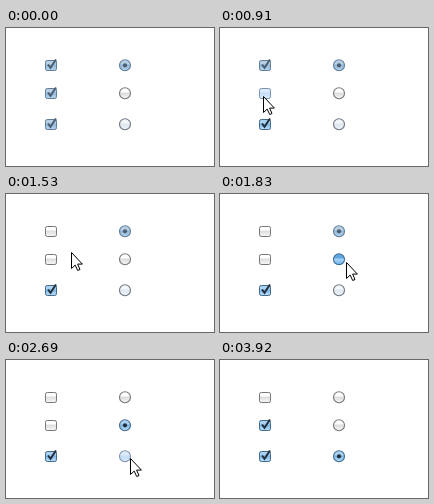
These frames come from a looping animation (208 px wide and 138 px high, 4.22 s). An HTML page with a canvas:

```html
<!DOCTYPE html>
<html lang="en">
<head>
<meta charset="utf-8">
<title>Checkboxes and radio buttons</title>
<style>
html, body { margin: 0; width: 100%; height: 100%; overflow: hidden; background: #fff; }
canvas { display: block; }
</style>
</head>
<body>
<canvas id="stage" width="208" height="138"></canvas>
<script>
const ctx = document.getElementById('stage').getContext('2d');
const LOOP = 4220, START = 220, STEP = 77.1;
const ROWS = [37, 65, 96], BOX_X = 45, RADIO_X = 119;

// border, top, middle, bottom, mark
const SKINS = {
  off: ['#777777', '#ffffff', '#dddddd', '#f5f5f5'],
  tint: ['#6c7480', '#f4f7fb', '#dfe6ee', '#eef3f9'],
  hover: ['#7c93b0', '#dceafa', '#c4dcf5', '#d9ebfd'],
  press: ['#3d6a94', '#5fa5e0', '#a9d4f7', '#6db4ee'],
  muted: ['#5f7d98', '#b9d0e4', '#93b8d8', '#b4d2ea', '#4b5d70'],
  on: ['#456b8c', '#a9d2f3', '#7cb7e8', '#b5dcfa', '#252f3b']
};

// Pointer tip for each step; a leg is [first step, x, y, x, y, ...].
const LEGS = [
  [0, 124, 127, 118, 119, 103, 105, 80, 89, 59, 77, 47, 72, 43, 70, 43, 68],
  [10, 43, 64, 44, 55, 45, 45, 46, 40],
  [16, 50, 45, 65, 58, 88, 71, 110, 76, 122, 73, 126, 68],
  [24, 126, 69, 127, 72, 128, 77, 128, 82, 127, 87, 125, 91,
    125, 96, 124, 100, 124, 98, 124, 98, 104, 91, 70, 79, 44, 69,
    37, 76, 36, 79, 40, 66, 42, 66, 43, 68],
  [44, 50, 74, 75, 91, 115, 111, 156, 128]
];
const EXIT = 48;

// [first step, skin] for every control
const BOXES = [
  [[-1, 'muted'], [12, 'on'], [15, 'hover'], [17, 'off']],
  [[-1, 'muted'], [5, 'on'], [9, 'hover'], [11, 'off'], [36, 'hover'],
    [37, 'off'], [40, 'hover'], [41, 'press'], [43, 'on']],
  [[-1, 'muted'], [4, 'on']]
];
const RADIOS = [
  [[-1, 'muted'], [23, 'off']],
  [[-1, 'off'], [20, 'hover'], [21, 'press'], [23, 'on'], [33, 'off']],
  [[-1, 'tint'], [29, 'hover'], [33, 'on']]
];

function skinAt(track, step) {
  let name = track[0][1];
  for (const [from, skin] of track) if (step >= from) name = skin;
  return SKINS[name];
}

function pointerAt(step) {
  if (step < 0 || step >= EXIT) return null;
  const leg = LEGS.filter(l => l[0] <= step).pop();
  const i = Math.min(1 + 2 * (step - leg[0]), leg.length - 2);
  return [leg[i], leg[i + 1]];
}

function gloss(y, r, skin) {
  const g = ctx.createLinearGradient(0, y - r, 0, y + r);
  g.addColorStop(0, skin[1]);
  g.addColorStop(0.4, skin[1]);
  g.addColorStop(0.5, skin[2]);
  g.addColorStop(1, skin[3]);
  return g;
}

function fillStroke(fill, stroke, width) {
  ctx.fillStyle = fill;
  ctx.strokeStyle = stroke;
  ctx.lineWidth = width;
  ctx.fill();
  ctx.stroke();
}

function drawBox(y, skin) {
  ctx.beginPath();
  ctx.roundRect(BOX_X - 5.5, y - 4.5, 11, 10, 1.8);
  fillStroke(gloss(y, 5, skin), skin[0], 1);
  if (!skin[4]) return;
  ctx.beginPath();
  ctx.moveTo(BOX_X - 3, y - 0.5);
  ctx.lineTo(BOX_X - 0.5, y + 2.8);
  ctx.lineTo(BOX_X + 5, y - 5.5);
  ctx.strokeStyle = skin[4];
  ctx.lineWidth = 2;
  ctx.stroke();
}

function drawRadio(y, skin) {
  ctx.beginPath();
  ctx.arc(RADIO_X, y + 0.3, 5.5, 0, Math.PI * 2);
  fillStroke(gloss(y, 5.5, skin), skin[0], 1.1);
  if (!skin[4]) return;
  ctx.beginPath();
  ctx.arc(RADIO_X, y + 0.3, 2.1, 0, Math.PI * 2);
  ctx.fillStyle = skin[4];
  ctx.fill();
}

const ARROW = new Path2D('M.5 .5V16.5L4.2 13.1L6.7 18.5L9 17.5L6.6 12.1H11.4Z');

function drawPointer(x, y) {
  ctx.save();
  ctx.translate(x, y);
  ctx.fillStyle = '#fff';
  ctx.strokeStyle = '#000';
  ctx.lineWidth = 1;
  ctx.fill(ARROW);
  ctx.stroke(ARROW);
  ctx.restore();
}

function draw(now) {
  const step = Math.floor((now % LOOP - START) / STEP + 0.15);
  ctx.fillStyle = '#fff';
  ctx.fillRect(0, 0, 208, 138);
  ROWS.forEach((y, i) => {
    drawBox(y, skinAt(BOXES[i], step));
    drawRadio(y, skinAt(RADIOS[i], step));
  });
  const tip = pointerAt(step);
  if (tip) drawPointer(...tip);
}

const began = performance.now();
function tick() {
  draw(performance.now() - began);
  requestAnimationFrame(tick);
}
tick();
</script>
</body>
</html>
```
